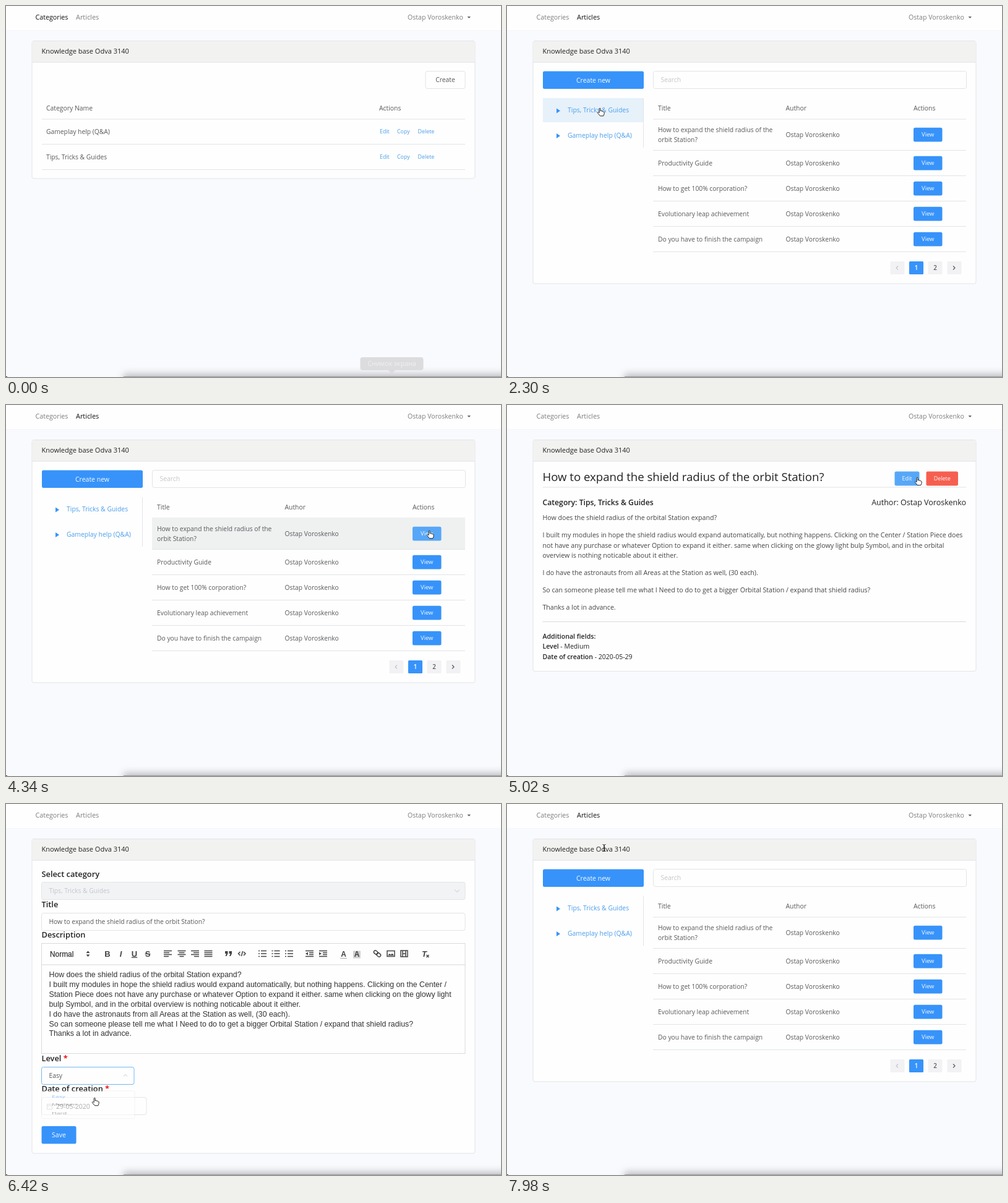
An HTML page for the animation above (8 s loop, 800 by 600 pixels).

```html
<!DOCTYPE html>
<html lang="en">
<head>
<meta charset="utf-8">
<title>Knowledge base</title>
<style>
  html, body { margin: 0; width: 100%; height: 100%; overflow: hidden; background: #f9fafd; }
  svg { display: block; width: 100%; height: 100%; font-family: "Open Sans", sans-serif; cursor: default; }
  text { white-space: pre; }
  .mono { font-family: "Liberation Sans", sans-serif; }
  .bold { font-weight: 600; }
  .mid { text-anchor: middle; }
  .end { text-anchor: end; }
  .bg { fill: transparent; }
  .row.hover .bg { fill: #eff0f0; }
  .side.hover .bg { fill: #e6f1fa; }
  .primary { fill: #3793fa; }
  .hover .primary { fill: #57a7f8; }
  .danger { fill: #f65f50; }
  .page.hover text { fill: #3793fa; }
  .icon { fill: none; stroke: #444; stroke-width: 1.5; }
</style>
</head>
<body>
<svg id="stage" viewBox="0 0 800 600"></svg>
<script>
const LOOP = 8000;
const AUTHOR = 'Ostap Voroskenko';
const TITLE = 'How to expand the shield radius of the orbit Station?';
const INK = '#58595c', DARK = '#222', MUTED = '#7e7e80', PALE = '#c4c6ca';
const PAPER = '#fefefe', SHADE = '#f2f2f1', LINE = '#e2e4e6', LINK = '#4b9eea', BLUE = '#3793fa';

// ---- markup helpers: text is placed by its vertical centre ----
const text = (x, y, str, size = 10.3, fill = INK, cls = '') =>
  `<text x="${x}" y="${y + size * .36}" font-size="${size}" fill="${fill}" class="${cls}">${str.replace(/&/g, '&amp;')}</text>`;
const rect = (x, y, w, h, attrs = '') => `<rect x="${x}" y="${y}" width="${w}" height="${h}" ${attrs}/>`;
const box = (x, y, w, h, fill = PAPER, id = '') =>
  rect(x, y, w, h, `rx="3" fill="${fill}" stroke="${LINE}" ${id && `id="${id}"`}`);
const rule = (x1, x2, y, color = LINE) => rect(x1, y, x2 - x1, 1, `fill="${color}"`);
const path = (d, attrs = 'class="icon"') => `<path d="${d}" ${attrs}/>`;
const hot = (x, y, w, h, cursor, content, cls = '', id = '') =>
  `<g data-hot="${[x, y, w, h]}" data-cursor="${cursor}" class="${cls}" ${id && `id="${id}"`}>${content}</g>`;
const button = (x, y, w, h, label, size = 9.4, cls = 'primary') =>
  hot(x, y, w, h, 'hand', rect(x, y, w, h, `rx="2.5" class="${cls}"`) +
    text(x + w / 2, y + h / 2, label, size, '#f8fbff', 'mid'));
const link = (x, y, label, size = 8.9) =>
  hot(x - 3, y - 7, label.length * 5 + 4, 14, 'hand', text(x, y, label, size, LINK));
const card = bottom =>
  box(42, 56.5, 716, bottom - 56.5) +
  rect(42.5, 57, 715, 34, `fill="${SHADE}"`) + rule(42, 758, 90.5) +
  hot(57, 64, 142, 18, 'beam', text(57.5, 73, 'Knowledge base Odva 3140', 11, DARK));

// ---- scenes ----
function categoriesScene() {
  const row = (y, name) => hot(58, y - 20, 684, 40, '', rect(58, y - 20, 684, 40, 'class="bg"') +
    text(65, y, name) + link(604, y, 'Edit') + link(632, y, 'Copy') + link(665.5, y, 'Delete') +
    rule(58, 742, y + 20), 'row');
  return card(279) + box(678, 105.5, 64, 28) + text(710, 119.5, 'Create', 10.4, INK, 'mid') +
    text(65, 165.5, 'Category Name', 10.4) + text(603, 165.5, 'Actions', 10.4) +
    rule(58, 742, 182.5) + row(203, 'Gameplay help (Q&A)') + row(244, 'Tips, Tricks & Guides');
}

function listScene() {
  const side = (y, name, id) => hot(58, y - 19.5, 162, 39, 'hand',
    rect(58, y - 19.5, 162, 39, 'class="bg"') +
    path(`M80 ${y - 3}l6 4-6 4z`, `fill="${BLUE}"`) + text(98, y, name, 10.4, LINK), 'side', id);
  const row = (y, h, lines) => hot(236, y - h / 2, 506, h, '',
    rect(236, y - h / 2, 506, h, 'class="bg"') +
    lines.map((s, i) => text(244, y + (i - (lines.length - 1) / 2) * 16.4, s)).join('') +
    text(450.5, y, AUTHOR) + button(657, y - 11.3, 46.5, 22.8, 'View') +
    rule(236, 742, y + h / 2 - .5), 'row');
  const page = (x, label, on) => hot(x, 413, 23, 21, 'hand',
    rect(x, 413, 23, 21, `rx="1.5" fill="${on ? BLUE : '#f2f2f4'}"`) +
    text(x + 11.5, 423.5, label, 9.8, on ? '#fff' : INK, 'mid bold'), on ? '' : 'page');
  const heads = [[244, 'Title'], [450.5, 'Author'], [657, 'Actions']];
  return card(449) + button(58, 105.5, 163, 28.5, 'Create new', 10.5) +
    hot(236, 105, 506, 29, 'beam', box(236.5, 105.5, 506, 28) + text(248.5, 119.5, 'Search', 10.4, PALE)) +
    rect(220, 149, 1, 80, `fill="${LINE}"`) +
    side(168.5, 'Tips, Tricks & Guides', 'tips') + side(209, 'Gameplay help (Q&A)') +
    heads.map(([x, s]) => text(x, 165.5, s, 10.4)).join('') + rule(236, 742, 182.5) +
    row(208, 51, ['How to expand the shield radius of the', 'orbit Station?']) +
    ['Productivity Guide', 'How to get 100% corporation?', 'Evolutionary leap achievement',
      'Do you have to finish the campaign'].map((s, i) => row(254 + i * 41, 41, [s])).join('') +
    page(619.5, '') + page(650, '1', true) + page(680.5, '2') + page(711.5, '') +
    path('M632 420.5l-3 3 3 3', `fill="none" stroke="${PALE}" stroke-width="1.2"`) +
    path('M721 420.5l3 3-3 3', `fill="none" stroke="${INK}" stroke-width="1.2"`);
}

function articleScene() {
  const paragraphs = [
    [182, 'How does the shield radius of the orbital Station expand?'],
    [210.5, 'I built my modules in hope the shield radius would expand automatically, but nothing happens. Clicking on the Center / Station Piece does'],
    [227, 'not have any purchase or whatever Option to expand it either. same when clicking on the glowy light bulp Symbol, and in the orbital'],
    [243.5, 'overview is nothing noticable about it either.'],
    [271.5, 'I do have the astronauts from all Areas at the Station as well, (30 each).'],
    [299.5, 'So can someone please tell me what I Need to do to get a bigger Orbital Station / expand that shield radius?'],
    [327.5, 'Thanks a lot in advance.']];
  const field = (y, name, value) =>
    text(57.5, y, `<tspan class="bold">${name}</tspan> - ${value}`, 10.5, DARK);
  return card(430.5) + text(57.5, 116, TITLE, 18.6, DARK) +
    button(626.5, 107.5, 40, 23, 'Edit', 9) + button(677.5, 107.5, 51.5, 23, 'Delete', 9, 'danger') +
    rule(57.5, 742, 132.5) + text(57.5, 157.5, 'Category: Tips, Tricks & Guides', 12.2, DARK, 'bold') +
    text(742, 157.5, 'Author: ' + AUTHOR, 12.5, DARK, 'end') +
    paragraphs.map(([y, s]) => text(57.5, y, s, 10.6, '#444')).join('') +
    rule(57.5, 742, 350, '#dadbdc') + text(57.5, 374, 'Additional fields:', 10.6, DARK, 'bold') +
    field(390.5, 'Level', '<tspan id="levelField">Medium</tspan>') +
    field(407, 'Date of creation', '2020-05-29');
}

function toolbar() {
  const solid = 'fill="#444"';
  const bars = (x, widths, align = 0) => path(widths.map((w, i) =>
    `M${x + (13 - w) * align} ${237.5 + i * 9 / (widths.length - 1)}h${w}`).join(''));
  const list = x => bars(x + 4, [9, 9, 9]) + path(`M${x} 237.5h2M${x} 242h2M${x} 246.5h2`);
  const glyph = (x, s, style = '') =>
    `<text x="${x}" y="246.5" font-size="13" font-weight="700" fill="#444" class="mid mono" style="${style}">${s}</text>`;
  const indent = (x, d) => bars(x, [13, 0, 0, 13]) + path(`M${x + 6} 240.5h7M${x + 6} 243.5h7`) +
    path(`M${x + (d > 0 ? 0 : 4)} 239.5l${4 * d} 2.5l${-4 * d} 2.5z`, solid);
  const chain = rect(593.5, 239.5, 7, 5, 'rx="2.5" class="icon"') + rect(599.5, 239.5, 7, 5, 'rx="2.5" class="icon"');
  return `<g stroke="#333" stroke-width=".25">${text(71, 243, 'Normal', 11.9, '#333', 'mono')}</g>` +
    path('M129.5 241l3-3.5 3 3.5zM129.5 243.5l3 3.5 3-3.5z', solid) +
    glyph(164, 'B') + glyph(185.5, 'I', 'font-style:italic') +
    glyph(207.5, 'U', 'text-decoration:underline') + glyph(229, 'S', 'text-decoration:line-through') +
    bars(255, [13, 9, 13, 8]) + bars(277.5, [13, 9, 13, 7], .5) + bars(299, [13, 9, 13, 8], 1) +
    bars(320.5, [13, 13, 13, 13]) +
    path('M354 238h4.5v4l-2 4h-2l1.5-4h-2zM360.5 238h4.5v4l-2 4h-2l1.5-4h-2z', solid) +
    path('M378.5 239l-3 3 3 3M384 239l3 3-3 3M382.5 238l-2 8') +
    list(408) + list(429.5) + list(451) + indent(484, -1) + indent(506, 1) +
    glyph(545.5, 'A', 'font-size:12px') + rule(540, 551, 249, '#aaa') +
    rect(561, 237.5, 12, 12, 'fill="#d0d0d0"') + glyph(567, 'A', 'font-size:12px') +
    `<g transform="rotate(40 600 242)">${chain}</g>` +
    rect(616, 237.5, 12, 9, 'class="icon"') + path('M617 245l3-3 2 2 2-2.5 3 3.5z', solid) +
    rect(638, 237, 11, 10, 'class="icon"') + path('M641 237v10M646 237v10M641 242h5') +
    glyph(676, 'T', 'font-style:italic') + path('M679.5 244l4 4m0-4l-4 4');
}

function editScene() {
  const label = (y, s, required) => text(57.5, y, s + (required ? ' <tspan fill="#f01414" font-weight="700">*</tspan>' : ''), 12.8, DARK, 'bold');
  const lines = ['How does the shield radius of the orbital Station expand?',
    'I built my modules in hope the shield radius would expand automatically, but nothing happens. Clicking on the Center /',
    'Station Piece does not have any purchase or whatever Option to expand it either. same when clicking on the glowy light',
    'bulp Symbol, and in the orbital overview is nothing noticable about it either.',
    'I do have the astronauts from all Areas at the Station as well, (30 each).',
    'So can someone please tell me what I Need to do to get a bigger Orbital Station / expand that shield radius?',
    'Thanks a lot in advance.'];
  const options = ['Easy', 'Medium', 'Hard'].map((s, i) => text(74, 18 + i * 26.2, s, 10.5, i ? INK : BLUE));
  return card(565) +
    label(113, 'Select category') + box(57.5, 126.5, 684.5, 28, '#f1f3f5') +
    text(69.5, 140.5, 'Tips, Tricks & Guides', 10.3, PALE) +
    path('M725 138.5l4 4 4-4', `fill="none" stroke="${PALE}"`) +
    label(162, 'Title') + box(57.5, 176.5, 684.5, 28) + text(69.5, 190, TITLE) +
    label(211.5, 'Description') + rect(57.5, 225.5, 684.5, 178, `fill="${PAPER}" stroke="#dadada"`) +
    rule(57.5, 742, 259.5, '#dadada') + toolbar() +
    lines.map((s, i) => text(69.5, 276 + i * 15.83, s, 12.3, '#333', 'mono')).join('') +
    label(411, 'Level', true) +
    hot(57.5, 425, 150, 28.5, 'hand', box(57.5, 425.5, 149.5, 28, PAPER, 'levelBox')) +
    text(69.5, 439.5, '<tspan id="levelInput">Medium</tspan>') +
    path('M190 437.5l3 3 3-3', `id="caret" fill="none" stroke="${PALE}"`) +
    label(460.5, 'Date of creation', true) + box(57.5, 474.5, 169.5, 28) +
    rect(66.5, 485.5, 8, 8, `fill="none" stroke="${PALE}"`) + rule(66.5, 74.5, 487.5, PALE) +
    text(81, 489, '29-05-2020', 10.5) + button(57.5, 521, 56, 28.5, 'Save', 10.5) +
    hot(57.5, 464, 150.5, 88, 'hand', box(57.5, 0, 150.5, 88) + options.join(''), '', 'menu');
}

const scenes = { categories: categoriesScene(), list: listScene(), article: articleScene(), edit: editScene() };
const stage = document.getElementById('stage');
stage.innerHTML = `
  <defs><filter id="blur" x="-10%" y="-100%" width="120%" height="300%"><feGaussianBlur stdDeviation="6"/></filter></defs>
  ${rect(0, 0, 800, 600, 'fill="#f9fafd"')}${rect(0, 0, 800, 39, `fill="${PAPER}"`)}${rule(0, 800, 39, '#f5f6f9')}
  <g id="nav">
    ${hot(42, 6, 64, 30, 'hand', text(47.5, 18.5, 'Categories', 10.7), 'categories')}
    ${hot(108, 6, 48, 30, 'hand', text(113, 18.5, 'Articles', 10.9), 'list')}
    ${text(649, 18.5, AUTHOR, 10.6, MUTED)}${path('M745.5 17h5.5l-2.75 3z', 'fill="#666"')}
  </g>
  ${Object.entries(scenes).map(([name, body]) => `<g id="${name}" class="scene">${body}</g>`).join('')}
  ${rect(190, 595, 640, 30, 'fill="#bcbcc0" filter="url(#blur)"')}${rule(190, 800, 599, '#9a9a9c')}${rule(0, 2, 599, '#333')}
  <g id="tooltip">${rect(572.5, 568, 102, 21, 'rx="4" fill="#dcdcde"')}
    ${path('M618 589h11l-5.5 6z', 'fill="#dcdcde"')}${text(623.5, 578.5, 'Снимок экрана', 10.6, '#f0f0f2', 'mid')}</g>
  <g id="status">${path('M-1 601V585.5H262q3 0 3 3V601z', 'fill="#a6dcd8" stroke="#86b0b0"')}
    ${text(3, 593, '<tspan id="address"></tspan>', 9.6, '#42605e', 'mono')}</g>
  <g id="pointer" stroke="#222" stroke-width="1" stroke-linejoin="round" fill="#fff">
    ${path('M-.8 7.5V1.3a1 1 0 0 1 2 0V5l.3-.6 1.5.3.4.6.4-.3 1.4.4.3.6 1 .1.6.8V9.5L5.8 12.8H.6L-3.4 8.2a.9.9 0 0 1 1.3-1.3z', 'class="hand"')}
    ${path('M0 0V12l2.8-2.6 1.9 4.3 1.9-.8-1.9-4.2H8.5z', 'class="arrow" fill="#222" stroke="#fff"')}
    ${path('M-2.5-5.5q2.5 0 2.5 1.5V4q0 1.5-2.5 1.5M2.5-5.5q-2.5 0-2.5 1.5V4q0 1.5 2.5 1.5M-1.5.5h3', 'class="beam" fill="none"')}
  </g>`;

// ---- timeline ----
const cuts = [[0, 'categories'], [740, 'list'], [4560, 'article'], [5220, 'edit'], [6900, 'article'], [7450, 'list']];
const route = [
  [60, 625, 590], [560, 133, 20], [800, 133, 20], [1400, 85, 24], [1640, 85, 24],
  [2250, 150, 165], [2450, 150, 165], [3250, 693, 427], [3450, 693, 427],
  [4250, 684, 203], [4500, 684, 203], [4920, 663, 117], [5150, 663, 117],
  [5800, 140, 437], [5980, 140, 437], [6200, 143, 475], [6450, 143, 475],
  [6750, 86, 532], [6880, 86, 532], [7300, 131, 20], [7500, 131, 20], [7900, 157, 71], [LOOP, 157, 71]];
const OPEN_MENU = 5950, PICK_LEVEL = 6350, MENU_FADE = 145;

const $ = id => document.getElementById(id);
const clamp = v => Math.max(0, Math.min(1, v));
const show = (el, on) => { el.style.display = on ? '' : 'none'; };

function pointerAt(t) {
  const i = Math.max(1, route.findIndex(k => k[0] > t));
  const [t0, x0, y0] = route[i - 1], [t1, x1, y1] = route[i];
  const p = clamp((t - t0) / (t1 - t0)), e = p * p * (3 - 2 * p);
  return [x0 + (x1 - x0) * e, y0 + (y1 - y0) * e];
}

function render(t) {
  const scene = cuts.filter(c => c[0] <= t).pop()[1];
  const [px, py] = pointerAt(t), visible = t >= 60;
  document.querySelectorAll('.scene').forEach(g => show(g, g.id === scene));

  const open = Math.min(clamp((t - OPEN_MENU) / MENU_FADE), clamp(1 - (t - PICK_LEVEL) / MENU_FADE));
  show($('menu'), open > 0);
  $('menu').setAttribute('transform', `translate(0 464) scale(1 ${open})`);
  $('menu').setAttribute('opacity', open);
  $('caret').setAttribute('transform', `rotate(${open > 0 ? 180 : 0} 193 439)`);
  $('levelBox').setAttribute('stroke', t > OPEN_MENU ? '#74b8f6' : LINE);
  $('levelInput').textContent = $('levelField').textContent = t < PICK_LEVEL ? 'Medium' : 'Easy';

  let cursor = 'arrow', navHover = '';
  document.querySelectorAll(`#nav [data-hot], #${scene} [data-hot]`).forEach(el => {
    const [x, y, w, h] = el.dataset.hot.split(',').map(Number);
    const inside = visible && el.style.display !== 'none' && px >= x && px < x + w && py >= y && py < y + h;
    el.classList.toggle('hover', inside);
    if (inside && el.dataset.cursor) cursor = el.dataset.cursor;
    if (inside && el.parentNode.id === 'nav') navHover = el.classList[0];
  });
  for (const name of ['categories', 'list'])
    document.querySelector(`#nav .${name} text`).setAttribute('fill', scene === name ? '#111' : MUTED);
  if (t > 2350 && t < 3420) $('tips').classList.add('hover');

  show($('status'), navHover);
  $('address').textContent = 'handy-answers-demo-app.invalid/.../' + (navHover === 'list' ? 'entry-set' : 'topic-list');
  $('tooltip').setAttribute('opacity', clamp(1 - t / 200));

  show($('pointer'), visible);
  $('pointer').setAttribute('transform', `translate(${px} ${py})`);
  for (const shape of $('pointer').children) show(shape, shape.classList.contains(cursor));
}

const start = performance.now();
(function frame() {
  render((performance.now() - start) % LOOP);
  requestAnimationFrame(frame);
})();
</script>
</body>
</html>
```
